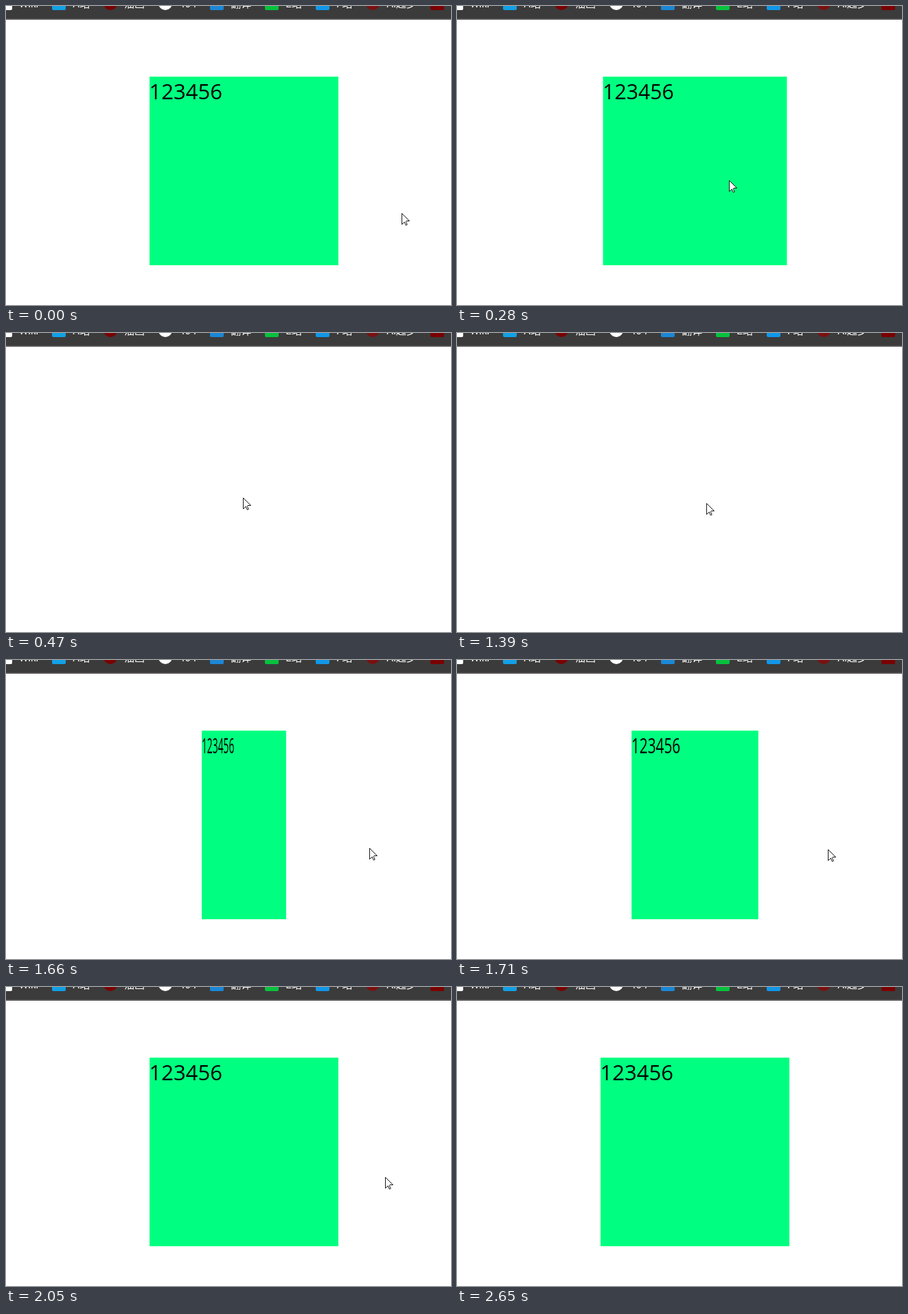
Recreate the animation shown at these times as an HTML page. Size 648 by 436 pixels, loop 2.98 s.

```html
<!DOCTYPE html>
<html lang="zh">
<head>
<meta charset="utf-8">
<title>Flip on hover</title>
<style>
  html, body { margin: 0; width: 100%; height: 100%; overflow: hidden; background: #fff; }
  #bar {
    position: absolute; width: 100%; height: 18px; overflow: hidden;
    background: #3b3b3b; border-bottom: 2px solid #575354;
  }
  #bookmarks {
    position: absolute; left: -11px; top: -14px; display: flex; white-space: nowrap;
    font: 15px/22px Roboto, "Noto Sans CJK SC", "Noto Sans CJK", sans-serif; color: #fff;
  }
  #bookmarks i { flex: none; width: 20px; height: 20px; margin-right: 10px; border-radius: 2px; }
  #bookmarks i.round { border-radius: 50%; }
  #bookmarks span { margin-right: 20px; }
  svg { position: absolute; left: 0; top: 0; }
  text { font: 31px "Open Sans", "Noto Sans", sans-serif; }
</style>
</head>
<body>
<div id="bar"><div id="bookmarks"></div></div>
<svg width="648" height="436">
  <g id="card">
    <rect x="-137.5" width="275" height="275" fill="#00ff80"/>
    <text x="-138" y="32.5">123456</text>
  </g>
  <path id="cursor" d="M.5 .5V16.5L4.2 13L6.3 17.8L8.2 17L6.3 12.4L7 11.5H11.5Z"
        fill="#fff" stroke="#000" stroke-width=".9"/>
</svg>
<script>
const LOOP = 2980, FLIP = 800;
const FLIP_OUT = 213, FLIP_BACK = 1360;
const STILL_FROM = 470, STILL_TO = 1390;

const easeOut = k => 1 - (1 - k) ** 2.7;
const easeIn = k => k * k;

// CSS "ease": cubic-bezier(.25, .1, .25, 1)
function ease(x) {
  const bezier = (s, a, b) => 3 * a * s * (1 - s) ** 2 + 3 * b * s * s * (1 - s) + s ** 3;
  let low = 0, high = 1;
  for (let i = 0; i < 24; i++) {
    const mid = (low + high) / 2;
    if (bezier(mid, .25, .25) < x) low = mid; else high = mid;
  }
  return bezier(low, .1, 1);
}

// The pointer runs from point to point; bend < 1 makes y lead x.
const outside = [576, 302], onCard = [345, 240], beside = [552, 277], offStage = [650, 440];
const moves = [
  { start: 140, end: 470, from: outside, to: onCard, curve: easeOut, bend: 1 },
  { start: 1340, end: 1870, from: onCard, to: beside, curve: ease, bend: .63 },
  { start: 2210, end: 2650, from: beside, to: offStage, curve: easeIn, bend: 1 }
];

const bookmarks = [
  ["Wiki", "#fff"], ["A站", "#12a0e6"], ["油画", "#7b0000", "round"],
  ["404", "#fff", "round"], ["翻译", "#1b87d6"], ["E站", "#06c23c"],
  ["F站", "#1197e8"], ["AI起步", "#7b1010", "round"], ["", "#7b0000"]
];
document.getElementById("bookmarks").innerHTML = bookmarks.map(([label, color, shape = ""]) =>
  `<i class="${shape}" style="background:${color}"></i><span>${label}</span>`).join("");

const card = document.getElementById("card");
const cursor = document.getElementById("cursor");
const progress = (t, start, length) => Math.min(1, Math.max(0, (t - start) / length));

function pointerAt(t) {
  const { start, end, from, to, curve, bend } = moves.findLast(m => m.start <= t) ?? moves[0];
  const k = curve(progress(t, start, end - start));
  const between = (axis, part) => Math.round(from[axis] + (to[axis] - from[axis]) * part);
  return [between(0, k), between(1, k ** bend)];
}

function draw(time) {
  let t = time % LOOP;
  if (t > STILL_FROM && t < STILL_TO) t = STILL_FROM;

  const turn = ease(progress(t, FLIP_OUT, FLIP)) - ease(progress(t, FLIP_BACK, FLIP));
  // The second flip starts only after the first is complete.
  const width = Math.cos(Math.PI * turn);
  card.style.display = width > .001 ? "" : "none"; // the back face is hidden
  card.setAttribute("transform", `translate(346.5 103) scale(${width} 1)`);
  cursor.setAttribute("transform", `translate(${pointerAt(t)})`);
}

const origin = performance.now();
function tick() {
  draw(performance.now() - origin);
  requestAnimationFrame(tick);
}
tick();
</script>
</body>
</html>
```
